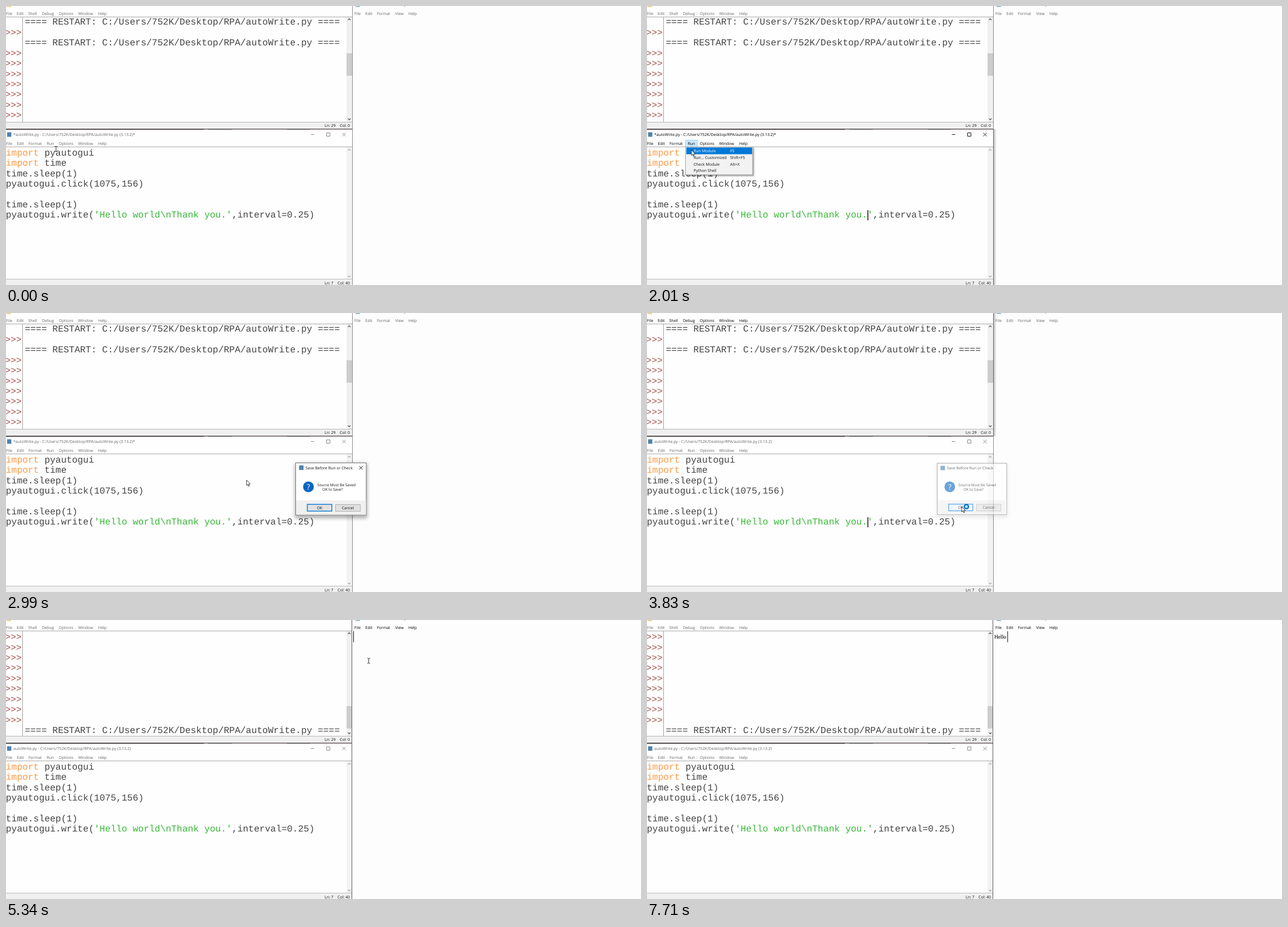
An HTML page for the animation above (7990 ms loop, 1130 px wide and 496 px high).

```html
<!DOCTYPE html>
<html lang="en">
<head>
<meta charset="utf-8">
<title>Script typing into an editor</title>
<style>
html, body { margin: 0; width: 100%; height: 100%; overflow: hidden; background: #fdfdfd; }
svg { display: block; }
text { font: 7px "Open Sans", "Noto Sans", sans-serif; fill: #111; white-space: pre; text-rendering: geometricPrecision; }
.mono { font: 16.35px "Liberation Mono", "Courier New", monospace; fill: #444; }
.wide { font-size: 16.4px; }
.prompt { fill: #a85050; }
.key { fill: #ff9a48; }
.str { fill: #38b838; }
.win .label { fill: #666; }
.win.on .label { fill: #000; }
.win .glyph { stroke: #888; fill: none; }
.win.on .glyph { stroke: #111; }
.win .shade { visibility: hidden; }
.win.on .shade { visibility: visible; }
.win.on .rest { visibility: hidden; }
.body { font-size: 6.6px; }
.mid { text-anchor: middle; }
#typed { font: 9.5px "Liberation Serif", "Times New Roman", serif; fill: #000; stroke: #000; stroke-width: .1px; }
</style>
</head>
<body>
<svg id="stage" width="1130" height="496" viewBox="0 0 1130 496"></svg>
<script>
const LOOP = 7990, ROW = 18.45;
const PATH = 'C:/Users/752K/Desktop/RPA/autoWrite.py';

// Markup helpers
const rect = (x, y, w, h, fill, more = '') =>
  `<rect x="${x}" y="${y}" width="${w}" height="${h}" fill="${fill}" ${more}/>`;
const path = (d, more = 'class="glyph"') => `<path d="${d}" ${more}/>`;
const label = (x, y, s, cls = 'label') => `<text x="${x}" y="${y + 2.5}" class="${cls}">${s}</text>`;
const mono = (x, y, s, cls = '') => `<text x="${x}" y="${y}" class="mono ${cls}">${s}</text>`;
const span = (cls, s) => `<tspan class="${cls}">${s}</tspan>`;
const group = (id, inner, more = '') => `<g id="${id}" ${more}>${inner}</g>`;
const menuBar = (y, items) => items.map(([x, s]) => label(x, y, s)).join('');
const chevron = (y, dir, color) =>
  path(`M608.5 ${y + dir} l2.3 ${-2.4 * dir} l2.3 ${2.4 * dir}`, `fill="none" stroke="${color}" stroke-width="1.1"`);

const prompts = (from, to) => Array.from({ length: to - from + 1 },
  (_, i) => mono(-1.6, 33.3 + (from + i) * ROW, '&gt;&gt;&gt;', 'prompt')).join('');
const restart = row => mono(33.4, 33 + row * ROW, `==== RESTART: ${PATH} ====`, 'wide');

const shell = group('shell',
  rect(0, 0, 616, 218, '#fefefe') +
  rect(1, 0, 8, 2, '#ecd58a') +
  menuBar(13, [[0, 'File'], [19, 'Edit'], [39.5, 'Shell'], [64, 'Debug'], [94, 'Options'], [128.5, 'Window'], [164, 'Help']]) +
  rect(606, 20, 10, 186, '#f0f0f0') +
  rect(606, 84, 10, 40, '#cdcdcd', 'id="thumb"') +
  chevron(24, 1, '#505050') + chevron(201, -1, '#505050') +
  group('before', restart(0) + prompts(1, 1) + restart(2) + prompts(3, 9), 'clip-path="url(#shellClip)"') +
  group('after', prompts(0, 8) + restart(9), 'clip-path="url(#shellClip)" transform="translate(0 1.8)"') +
  rect(0, 19, 616, 1, '#a8a8a8') + rect(29, 20, 1, 186, '#a0a0a0') +
  rect(0, 206, 616, 1, '#b4b4b4') + rect(0, 207, 616, 11, '#f0f0f0') +
  label(567, 212.5, 'Ln: 29', '') + label(594, 212.5, 'Col: 0', '') +
  rect(616, 0, 6, 219, 'url(#side)', 'class="shade"'), 'class="win"');

const code = [
  span('key', 'import') + ' pyautogui',
  span('key', 'import') + ' time',
  'time.sleep(1)',
  'pyautogui.click(1075,156)',
  '',
  'time.sleep(1)',
  'pyautogui.write(' + span('str', "'Hello world\\nThank you.'") + ',interval=0.25)'
].map((s, i) => mono(-.2, 265.7 + i * ROW, s)).join('');

const editor = group('edit',
  rect(0, 218, 616, 278, '#fefefe') +
  rect(0, 218, 616, 1, '#6a6466') + rect(0, 219, 352, 1, '#3e393b') +
  rect(352, 219, 264, 1, '#a49c9c') + rect(360, 219, 42, 1, '#6e6e6e') + rect(500, 219, 41, 1, '#6e6e6e') +
  rect(2, 224.5, 7.5, 8, '#4d83ad') +
  `<text id="title" x="13" y="231" class="label"></text>` +
  path('M542.5 228.5h6M570.5 225.5h6v6h-6zM598.5 225.5l6 6m0-6l-6 6') +
  rect(68.5, 238.5, 21, 12, '#cce8ff', 'id="head" stroke="#99d1ff"') +
  menuBar(244, [[0, 'File'], [19.5, 'Edit'], [40, 'Format'], [72.5, 'Run'], [94, 'Options'], [128.5, 'Window'], [164, 'Help']]) +
  rect(0, 250, 616, 1, '#a8a8a8') +
  rect(606, 251, 10, 235, '#f3f3f3') + chevron(256, 1, '#a6a6a6') + chevron(480.5, -1, '#a6a6a6') +
  code + rect(392.4, 363, 1.4, 18, '#000', 'id="caret"') +
  rect(0, 485, 616, 1, '#bcbcbc') + rect(0, 486, 616, 10, '#f0f0f0') +
  label(567, 492, 'Ln: 7', '') + label(590, 492, 'Col: 40', '') +
  rect(616, 219, 6, 277, 'url(#side)', 'class="shade"'), 'class="win"');

const menuItems = [['Run Module', 'F5'], ['Run... Customized', 'Shift+F5'], ['Check Module', 'Alt+X'], ['Python Shell', '']];
const dropdown = group('menu',
  rect(70, 252, 120.5, 50.5, '#000', 'opacity=".35" filter="url(#blur1)"') +
  rect(68.5, 250.5, 119.5, 49.5, '#f2f2f2', 'stroke="#a0a0a0"') +
  rect(70, 251.5, 117, 12, '#0078d7', 'id="pick"') +
  menuItems.map(([s, key], i) => `<g class="item">${label(83, 257.5 + i * 11.8, s, '') + label(148, 257.5 + i * 11.8, key, '')}</g>`).join(''));

const note = group('note',
  rect(616, 0, 514, 496, '#fdfdfd') +
  rect(622, 0, 8, 1.6, '#8fb4c4') + rect(709, 0, 1, 1.2, '#777') +
  menuBar(13, [[620, 'File'], [639.5, 'Edit'], [660, 'Format'], [692.5, 'View'], [716, 'Help']]) +
  rect(616, 0, 1, 496, '#8a8a8a', 'class="rest"') +
  `<text id="typed" x="618" y="33.3"></text>` +
  rect(618, 20, 1, 19.5, '#000', 'id="noteCaret"'), 'class="win"');

const dialog = group('dialog',
  rect(514, 267, 129, 98, '#000', 'id="dialogShade" filter="url(#blur3)"') +
  rect(515.5, 266.5, 125.5, 92.5, '#fff', 'stroke="#777"') +
  rect(516, 333, 124.5, 25.5, '#f0f0f0') +
  rect(521.5, 271, 8, 8, '#4d83ad') +
  label(533, 275, 'Save Before Run or Check', '') +
  path('M628.7 272.2l6 6m0-6l-6 6', 'id="close" stroke="#111" fill="none"') +
  `<circle cx="538.2" cy="309" r="9.6" fill="#0b66c0"/>
   <text x="538.2" y="314" class="mid" style="font-size:13.5px;fill:#fff">?</text>` +
  label(554, 305.5, 'Source Must Be Saved', 'body') + label(563, 313.5, 'OK to Save?', 'body') +
  rect(536.2, 340.2, 43.6, 12, '#e1e1e1', 'id="ok" stroke="#0078d7" stroke-width="1.4"') +
  rect(586.5, 340.5, 44, 12, '#e1e1e1', 'stroke="#adadad"') +
  label(558, 346.5, 'OK', 'mid') + label(608.5, 346.5, 'Cancel', 'mid'));

const pointers =
  group('arrow', path('M0 0v9.6l2.2-2 1.5 3.4 1.5-.7-1.5-3.2h3z', 'fill="#fff" stroke="#111" stroke-width=".8"') +
    '<circle id="busy" cx="8.4" cy=".2" r="3.6" fill="#e8f5ff" stroke="#0f78cf" stroke-width="2.6"/>') +
  group('beam', path('M-2.5-4.5h2l.5.5.5-.5h2M0-4v8M-2.5 4.5h2l.5-.5.5.5h2', 'fill="none" stroke="#333" stroke-width="1"'));

document.getElementById('stage').innerHTML = `<defs>
  <linearGradient id="side"><stop stop-color="#000" stop-opacity=".3"/><stop offset="1" stop-color="#000" stop-opacity="0"/></linearGradient>
  <filter id="blur1"><feGaussianBlur stdDeviation="1.2"/></filter>
  <filter id="blur3"><feGaussianBlur stdDeviation="3"/></filter>
  <clipPath id="shellClip"><rect x="0" y="20" width="606" height="186"/></clipPath>
</defs>` + note + shell + editor +
  group('edge', rect(615, 0, 1, 496, '#5a5a5a')) + dropdown + dialog + pointers;

// Each step lists only what changes at that time.
const steps = [
  [0, { active: '', ptr: 'beam', x: 89, y: 254, busy: 0, head: 0, menu: 0, pick: 0, caret: 0,
        dialog: 0, ok: '#e1e1e1', saved: 0, ran: 0, typed: 0, noteCaret: 0 }],
  [120, { x: 87, y: 253 }],
  [240, { x: 85, y: 252.5 }],
  [360, { x: 83, y: 252 }],
  [510, { ptr: 'arrow', x: 80, y: 245 }],
  [640, { x: 79, y: 246 }],
  [790, { active: 'edit', head: 1 }],
  [910, { menu: .6, caret: 1 }],
  [1040, { menu: 1 }],
  [1180, { caret: 0 }],
  [1300, { menu: 0, head: .5 }],
  [1580, { menu: 1, head: 1 }],
  [1730, { caret: 1, y: 249 }],
  [1860, { y: 255 }],
  [2010, { y: 256, pick: 1 }],
  [2160, { caret: 0 }],
  [2280, { menu: 0, pick: 0, head: 0 }],
  [2430, { active: '' }],
  [2560, { x: 89, y: 260, dialog: .5 }],
  [2710, { x: 396, y: 290, dialog: 1 }],
  [2990, { x: 428, y: 297 }],
  [3140, { x: 508, y: 324 }],
  [3270, { x: 560, y: 344 }],
  [3420, { ok: '#e5f1fb' }],
  [3830, { active: 'shell', saved: 1, caret: 1, busy: 1, dialog: .6 }],
  [3980, { dialog: .2 }],
  [4100, { dialog: 0 }],
  [4220, { caret: 0, ran: 1 }],
  [5340, { active: 'note', ptr: 'beam', x: 645.5, y: 72.5, busy: 0, noteCaret: 1 }],
  [5900, { noteCaret: 0 }],
  [6470, { ptr: '', noteCaret: 1, typed: 1 }],
  [6750, { typed: 2 }],
  [7030, { typed: 3 }],
  [7180, { typed: 4 }],
  [7460, { typed: 5 }],
  [7710, { typed: 6 }]
];
const caretX = [618, 624.8, 629, 632, 634.3, 639, 641.3];

const $ = id => document.getElementById(id);
const fade = (id, v) => { $(id).style.opacity = v; };
const firstItem = document.querySelectorAll('#pick + .item text');

function draw(t) {
  const s = Object.assign({}, ...steps.filter(([at]) => at <= t).map(([, change]) => change));
  for (const id of ['shell', 'edit', 'note']) $(id).classList.toggle('on', s.active === id);
  for (const id of ['head', 'menu', 'pick', 'caret', 'dialog', 'busy', 'noteCaret']) fade(id, s[id]);
  for (const id of ['arrow', 'beam']) {
    fade(id, s.ptr === id ? 1 : 0);
    $(id).setAttribute('transform', `translate(${s.x} ${s.y})`);
  }
  fade('before', 1 - s.ran);
  fade('after', s.ran);
  fade('edge', s.active === 'note' ? 1 : 0);
  $('thumb').setAttribute('y', s.ran ? 153 : 84);
  const star = s.saved ? '' : '*';
  $('title').textContent = `${star}autoWrite.py - ${PATH} (3.13.2)${star}`;
  firstItem.forEach(e => { e.style.fill = s.pick ? '#fff' : '#111'; });
  $('ok').setAttribute('fill', s.ok);
  const whole = s.dialog === 1;
  $('dialog').setAttribute('transform', `translate(578 312.5) scale(${whole ? 1 : .985}) translate(-578 -312.5)`);
  fade('dialogShade', whole ? .3 : .12);
  fade('close', whole ? 1 : 0);
  $('typed').textContent = 'Hello '.slice(0, s.typed);
  $('noteCaret').setAttribute('x', caretX[s.typed]);
}

const start = performance.now();
function tick() {
  draw((performance.now() - start) % LOOP);
  requestAnimationFrame(tick);
}
tick();
</script>
</body>
</html>
```
